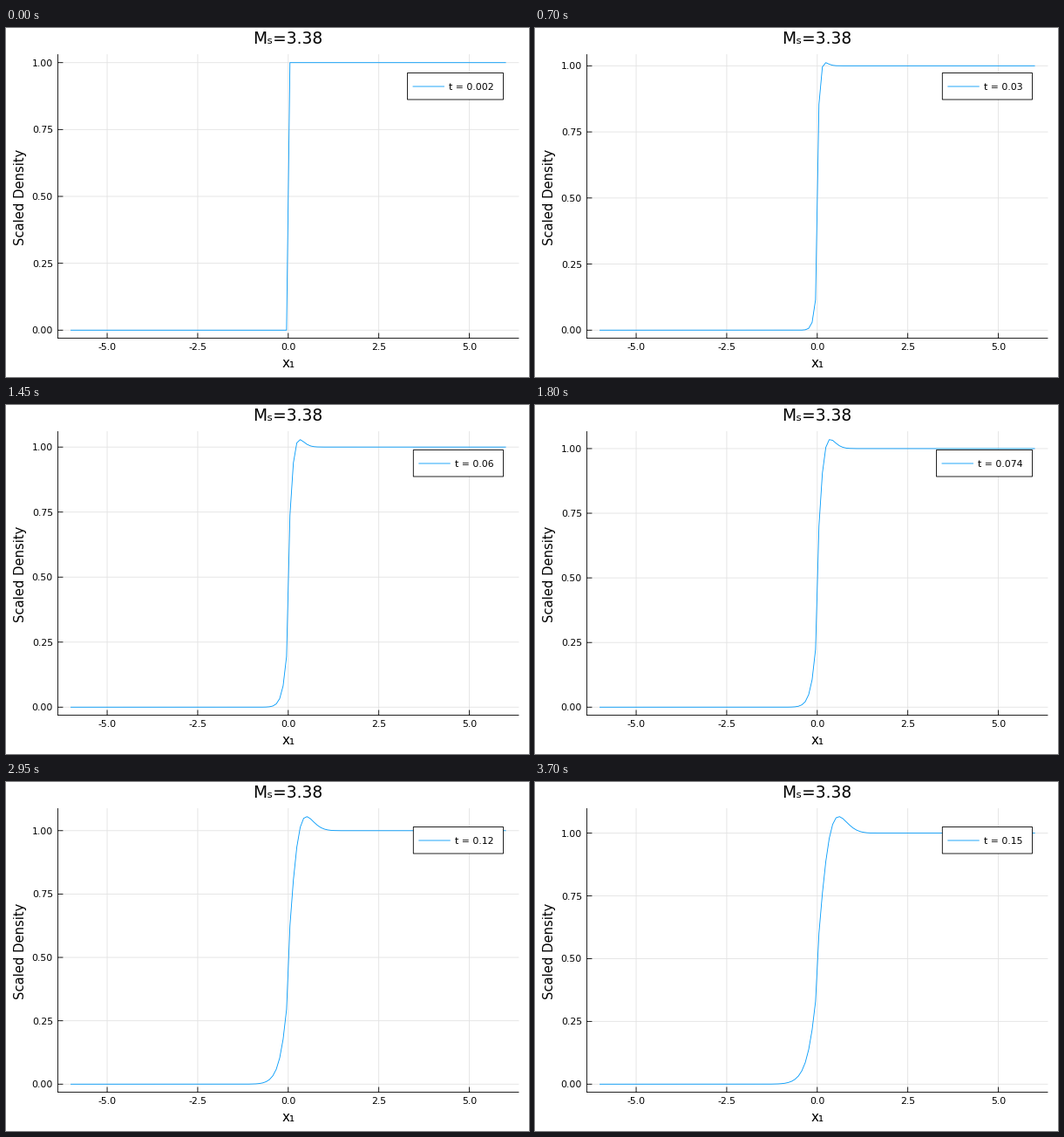
A matplotlib script for the animation above (3750 ms loop, 600 px wide and 400 px high).

```python
import numpy as np
import matplotlib.pyplot as plt
from matplotlib.animation import FuncAnimation
from matplotlib.patches import Rectangle

plt.rcParams["font.family"] = "DejaVu Sans"

W, H = 600, 400
FRAMES, INTERVAL = 75, 50
DT = 0.002
MACH = 3.38
RELAX, GAIN = 3.0, 0.8  # collision rate, density growth in the mixing zone
LEFT, RIGHT, TOP, BOTTOM = 59.5, 588, 30.5, 355.5
BLUE = "#009afa"

# Gas states on both sides of the shock (monatomic, R*T = 1 upstream)
M2 = MACH ** 2
RHO = 4 * M2 / (M2 + 3)
SPEED = MACH * np.sqrt(5 / 3)
HEAT = (5 * M2 - 1) * (M2 + 3) / (16 * M2)

x = np.linspace(-6, 6, 128)
dx = x[1] - x[0]
dv = 0.2
v = np.arange(-10.9, 13, dv)


def maxwellian(n, u, T):
    """Reduced equilibrium: density part and transverse energy part."""
    n, u, T = (np.asarray(a)[..., None] for a in (n, u, T))
    g = n / np.sqrt(2 * np.pi * T) * np.exp(-(v - u) ** 2 / (2 * T))
    return np.stack([g, 2 * T * g])


def rate(f):
    """Upwind transport, relaxation to equilibrium and density growth."""
    g, h = f
    n = g.sum(1) * dv
    u = (g * v).sum(1) * dv / n
    pxx = (g * v ** 2).sum(1) * dv - n * u ** 2
    p = (pxx + h.sum(1) * dv) / 3
    m = maxwellian(n, u, p / n)
    step = np.diff(f, axis=1) / dx
    out = RELAX * (m - f) + GAIN * (pxx / p - 1)[:, None] * m
    out[:, 1:] -= np.maximum(v, 0) * step
    out[:, :-1] -= np.minimum(v, 0) * step
    out[:, [0, -1]] = 0
    return out


def solve():
    right = x > 0
    f = maxwellian(np.where(right, RHO, 1.0),
                   np.where(right, SPEED / RHO, SPEED),
                   np.where(right, HEAT, 1.0))
    profiles = []
    for _ in range(FRAMES):
        profiles.append((f[0].sum(1) * dv - 1) / (RHO - 1))
        k1 = rate(f)
        k2 = rate(f + DT * k1)
        f = f + DT / 2 * (k1 + k2)
    return profiles


profiles = solve()

fig = plt.figure(figsize=(W / 100, H / 100), dpi=100, facecolor="white")
ax = fig.add_axes([0, 0, 1, 1])
ax.set_xlim(0, W)
ax.set_ylim(H, 0)
ax.axis("off")


def px(value):
    return 323.8 + value * (RIGHT - LEFT) / 12.72


def line(xs, ys, color="black", **kw):
    return ax.plot(xs, ys, color=color, lw=0.62, snap=False, **kw)[0]


def label(tx, ty, s, size, ha="center", **kw):
    return ax.text(tx, ty, s, size=size, ha=ha, va="baseline", **kw)


GRID = dict(color="#e3e3e3", zorder=1)

for value in (-5, -2.5, 0, 2.5, 5):
    gx = px(value)
    line([gx, gx], [TOP, BOTTOM], **GRID)
    line([gx, gx], [BOTTOM, BOTTOM - 5.5], zorder=3)
    label(gx, 369, f"{value:.1f}", 7.8)

rows = []
for value in (0, 0.25, 0.5, 0.75, 1):
    rows.append((value,
                 line([LEFT, RIGHT], [0, 0], **GRID),
                 line([LEFT, LEFT + 5.5], [0, 0], zorder=3),
                 label(54, 0, f"{value:.2f}", 7.8, "right")))

line([LEFT, LEFT], [TOP, BOTTOM], zorder=3)
line([LEFT, RIGHT], [BOTTOM, BOTTOM], zorder=3)
label(323.5, 18, "Mₛ=3.38", 13.4)
label(323.8, 389, "x₁", 11)
label(21.5, 193.5, "Scaled Density", 10.6, rotation=90,
      rotation_mode="anchor")

curve = line(px(x), 0 * x, BLUE, zorder=4)
box = ax.add_patch(Rectangle((460.5, 51.5), 110, 30.5, fc="white",
                             ec="black", lw=0.62, snap=False, zorder=5))
sample = line([467, 502.5], [67, 67], BLUE, zorder=6)
legend = label(508, 71, "", 7.8, "left", zorder=6)


def draw(i):
    s = profiles[i]
    lo, span = s.min(), np.ptp(s)

    def py(value):
        return BOTTOM - ((value - lo) / span + 0.03) / 1.06 * (BOTTOM - TOP)

    curve.set_ydata(py(s))
    for value, grid, tick, text in rows:
        y = py(value)
        grid.set_ydata([y, y])
        tick.set_ydata([y, y])
        text.set_y(y + 4)

    time = f"{DT * (i + 1):.3g}"
    left = 460.5 + 6.8 * (5 - len(time))
    box.set_x(left)
    box.set_width(570.5 - left)
    sample.set_xdata([left + 6.5, left + 42])
    legend.set_x(left + 47.5)
    legend.set_text("t = " + time)
    return []


anim = FuncAnimation(fig, draw, frames=FRAMES, interval=INTERVAL,
                     init_func=lambda: draw(0), repeat=True, repeat_delay=0)
plt.show()
```
